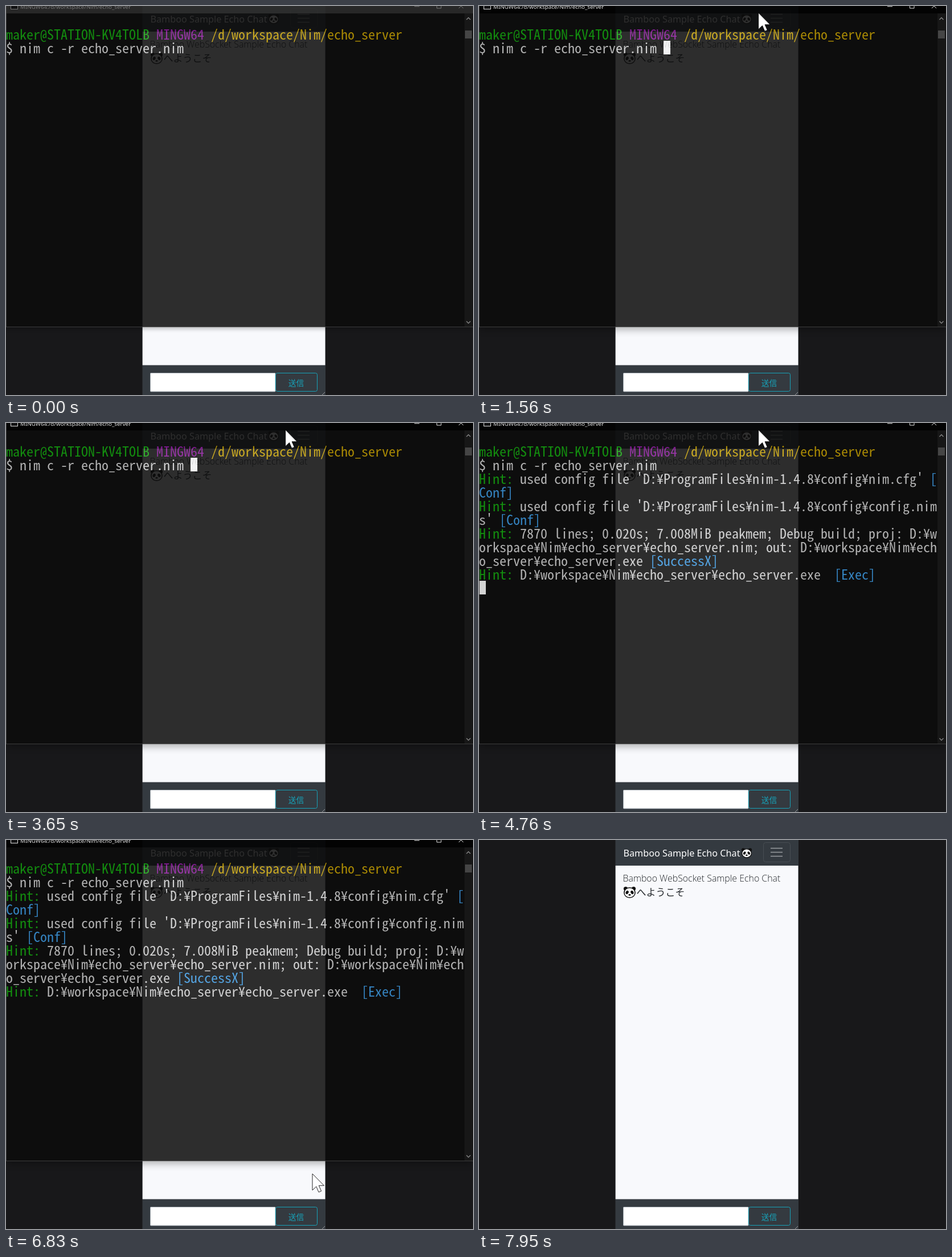
An HTML page for the animation above (8000 ms loop, 820x683 px).

```html
<!DOCTYPE html>
<html lang="ja">
<head>
<meta charset="utf-8">
<title>Echo chat server</title>
<style>
html, body { margin: 0; width: 100%; height: 100%; overflow: hidden; background: #18181a; }
svg { position: absolute; left: 0; top: 0; overflow: visible; }
.page { font-family: "Noto Sans", "Open Sans", "Noto Sans CJK JP", sans-serif; }
.light { font-family: "Open Sans", "Noto Sans", sans-serif; font-weight: 300; }
.ja { font-family: "Noto Sans CJK JP", "Noto Sans CJK", sans-serif; }
#term {
  position: absolute; left: 0; top: 0; width: 820px; height: 564px; box-sizing: border-box;
  overflow: hidden; opacity: .86; background: #0c0c0c; border: solid #444; border-width: 0 0 1px 1px;
  box-shadow: 0 2px 8px rgba(0, 0, 0, .35);
  --bar: #2b2b2b; --ink: #858585;
}
#term.active { box-shadow: 0 3px 14px rgba(0, 0, 0, .4); --bar: #000; --ink: #fff; }
#term svg { left: -1px; }
pre {
  position: absolute; left: -1px; top: 37px; margin: 0; color: #ccc;
  font: 24px/24px "Noto Sans Mono CJK JP", "Noto Sans Mono", monospace;
}
.g { color: #13a10e; } .m { color: #881798; } .y { color: #c19c00; } .b { color: #3a96dd; }
#caret { position: absolute; width: 12px; height: 24px; margin-left: -1px; background: #f2f2f2; }
</style>
</head>
<body>
<svg class="page" width="820" height="683">
  <defs>
    <g id="panda">
      <circle cx="-7" cy="-6.5" r="3.6" fill="#111"/><circle cx="7" cy="-6.5" r="3.6" fill="#111"/>
      <ellipse cy=".5" rx="9.6" ry="8.8" fill="#fff" stroke="#111" stroke-width="1.5"/>
      <ellipse cx="-4.4" cy="0" rx="2.4" ry="3.3" transform="rotate(30 -4.4 0)" fill="#111"/>
      <ellipse cx="4.4" cy="0" rx="2.4" ry="3.3" transform="rotate(-30 4.4 0)" fill="#111"/>
      <ellipse cy="4.4" rx="2.1" ry="1.4" fill="#111"/>
    </g>
  </defs>
  <rect x="239.5" width="321.5" height="683" fill="#343a40"/>
  <rect x="239.7" y="45" width="320.8" height="585.6" fill="#f8f9fc"/>
  <text x="253.5" y="29" font-size="16.2" fill="#fff">Bamboo Sample Echo Chat</text>
  <use href="#panda" transform="translate(470 23) scale(.86)"/>
  <rect x="499.5" y="4.5" width="47" height="34" rx="4" fill="none" stroke="#484e53"/>
  <path d="M512 14.5h21m-21 7h21m-21 7h21" stroke="#999da0" stroke-width="1.4"/>
  <g fill="#212529">
    <text class="light" x="252.5" y="73" font-size="15.9">Bamboo WebSocket Sample Echo Chat</text>
    <text class="ja" x="276.5" y="97.5" font-size="17">へようこそ</text>
  </g>
  <use href="#panda" transform="translate(264.5 92)"/>
  <rect x="253.5" y="644.5" width="219.500" height="32.500" rx="1" fill="#fff" stroke="#a9b0b7"/>
  <rect x="473.5" y="644.5" width="73" height="32" rx="3" fill="none" stroke="#17a2b8"/>
  <text class="ja" x="509.5" y="666.5" font-size="13.7" fill="#17a2b8" text-anchor="middle">送信</text>
  <path d="M555 683l5-5" stroke="#999"/>
</svg>

<div id="term">
  <svg width="820" height="563">
    <rect width="820" height="13" style="fill:var(--bar)"/>
    <rect x="8.5" y="-6" width="12" height="11.5" fill="#111" style="stroke:var(--ink)"/>
    <text x="25" y="4.5" font-size="9.8" font-family="Noto Sans, Open Sans, sans-serif" style="fill:var(--ink)">MINGW64:/d/workspace/Nim/echo_server</text>
    <path d="M717 .8h9M756.5-4v8h7.500v-8M795-4l8 8m0-8l-8 8" fill="none" style="stroke:var(--ink)"/>
    <rect x="805" y="13" width="14" height="550" fill="#171717"/>
    <rect x="806" y="43" width="12" height="14" fill="#4d4d4d"/>
    <path d="M808.500 24l3.500-3.500 3.500 3.500M808.500 553.500l3.500 3.500 3.500-3.500" fill="none" stroke="#999" stroke-width="1.3"/>
  </svg>
  <pre><span class="g">maker@STATION-KV4TOLB</span> <span class="m">MINGW64</span> <span class="y">/d/workspace/Nim/echo_server</span>
$ nim c -r echo_server.nim
<span id="config"><span class="g">Hint:</span> used config file 'D:¥ProgramFiles¥nim-1.4.8¥config¥nim.cfg' <span class="b">[
Conf]</span>
<span class="g">Hint:</span> used config file 'D:¥ProgramFiles¥nim-1.4.8¥config¥config.nim
s' <span class="b">[Conf]</span>
</span><span id="build"><span class="g">Hint:</span> 7870 lines; 0.020s; 7.008MiB peakmem; Debug build; proj: D:¥w
orkspace¥Nim¥echo_server¥echo_server.nim; out: D:¥workspace¥Nim¥ech
o_server¥echo_server.exe <span class="b">[SuccessX]</span>
<span class="g">Hint:</span> D:¥workspace¥Nim¥echo_server¥echo_server.exe  <span class="b">[Exec]</span></span></pre>
  <div id="caret"></div>
</div>

<svg id="pointer" width="1" height="1" fill="#fff" stroke="#000">
  <path id="arrow" transform="scale(1.7)" stroke-width=".5" d="M0 0V17L4 13.200 6.500 19 9.200 17.900 6.700 12.200H12Z"/>
  <path id="hand" d="M-3 3Q0-3 3 3V14Q18 14 18 19V27Q16 31 15 37H-2Q-5 30-9 24Q-11 18-3 21Z"/>
</svg>

<script>
const LOOP = 8000, CELL = 12;
const [term, config, build, caret, pointer, arrow, hand] =
  ['term', 'config', 'build', 'caret', 'pointer', 'arrow', 'hand'].map(id => document.getElementById(id));

// Choose the font size whose character cell is 12px wide
const pre = document.querySelector('pre');
const pen = document.createElement('canvas').getContext('2d');
pen.font = '24px "Noto Sans Mono CJK JP", "Noto Sans Mono", monospace';
pre.style.fontSize = 24 * CELL / pen.measureText('0').width + 'px';

// Pointer strokes: start, end, then start, control and end points
const strokes = [
  [90, 910, [775, 655], [632, 330], [490.7, 12]],
  [5810, 6590, [490.7, 12], [305, 377], [562, 583]],
  [6600, 6830, [562, 583], [550, 586], [538, 586]],
  [7090, 7750, [538, 586], [535, 300], [523, 31]]
];
const between = (t, ...spans) => spans.some(([a, b]) => t >= a && t < b);
const show = (el, on) => { el.style.visibility = on ? 'visible' : 'hidden'; };

function pointerAt(t) {
  const [start, end, a, c, b] = strokes.filter(s => s[0] <= t).pop() || strokes[0];
  const u = Math.min(1, Math.max(0, (t - start) / (end - start)));
  const p = u * u * (3 - 2 * u), q = 1 - p;
  return a.map((v, i) => q * q * v + 2 * p * q * c[i] + p * p * b[i]);
}

function frame() {
  const t = performance.now() % LOOP;
  const done = t >= 4760;
  term.style.display = t < 6990 ? '' : 'none';
  term.classList.toggle('active', t >= 1070);
  show(config, t >= 4670);
  show(build, done);
  show(caret, between(t, [1560, 2120], [2640, 3190], [3650, 4210], [4760, 5810], [6340, 6830]));
  caret.style.left = (done ? 0 : 27 * CELL) + 'px';
  caret.style.top = (done ? 277 : 61) + 'px';

  const [x, y] = pointerAt(t);
  const visible = between(t, [90, 6990], [7090, 7950]);
  const overButton = t > 7000 && y < 38;
  show(arrow, visible && !overButton);
  show(hand, visible && overButton);
  pointer.style.transform = `translate(${x}px, ${y}px)`;
  requestAnimationFrame(frame);
}
frame();
</script>
</body>
</html>
```
